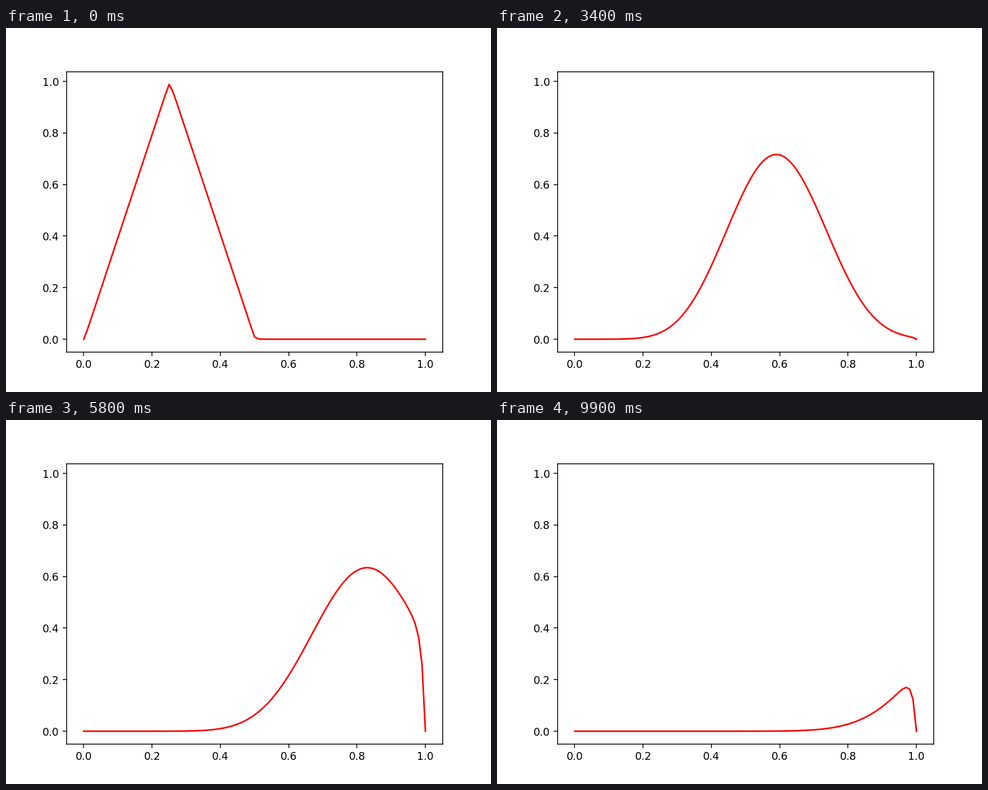
Write a matplotlib script that moves like this. It is 864 px wide and 648 px high and loops after 10000 ms.

```python
import numpy as np
import matplotlib.pyplot as plt
from matplotlib.animation import FuncAnimation

# Advection-diffusion of a triangular pulse, implicit Euler in time
CELLS = 100
FRAMES = 100
SUBSTEPS = 6
SPEED = 1.0
DIFFUSION = 0.0108

x = np.linspace(0, 1, CELLS + 1)
dx = 1 / CELLS
dt = 1 / (FRAMES * SUBSTEPS)


def step_matrix():
    c = SPEED * dt / dx
    r = DIFFUSION * dt / dx**2
    n = CELLS + 1
    a = (np.diag(np.full(n, 1 + 2 * r))
         + np.diag(np.full(n - 1, -r - c / 2), -1)
         + np.diag(np.full(n - 1, -r + c / 2), 1))
    # Both ends are held at zero
    a[0] = a[-1] = 0
    a[0, 0] = a[-1, -1] = 1
    return np.linalg.inv(a)


def solve():
    step = step_matrix()
    jump = np.linalg.matrix_power(step, SUBSTEPS)
    u = step @ np.maximum(0, 1 - 4 * np.abs(x - 0.25))
    states = [u]
    for _ in range(FRAMES - 1):
        u = jump @ u
        states.append(u)
    return states


states = solve()

fig, ax = plt.subplots(figsize=(6.4, 4.8), dpi=135)
line, = ax.plot(x, states[0], color="red")
ax.set_xlim(ax.get_xlim())
ax.set_ylim(ax.get_ylim())


def update(i):
    line.set_ydata(states[i])
    return line,


anim = FuncAnimation(fig, update, frames=FRAMES, interval=100,
                     repeat=True, repeat_delay=0)
plt.show()
```
